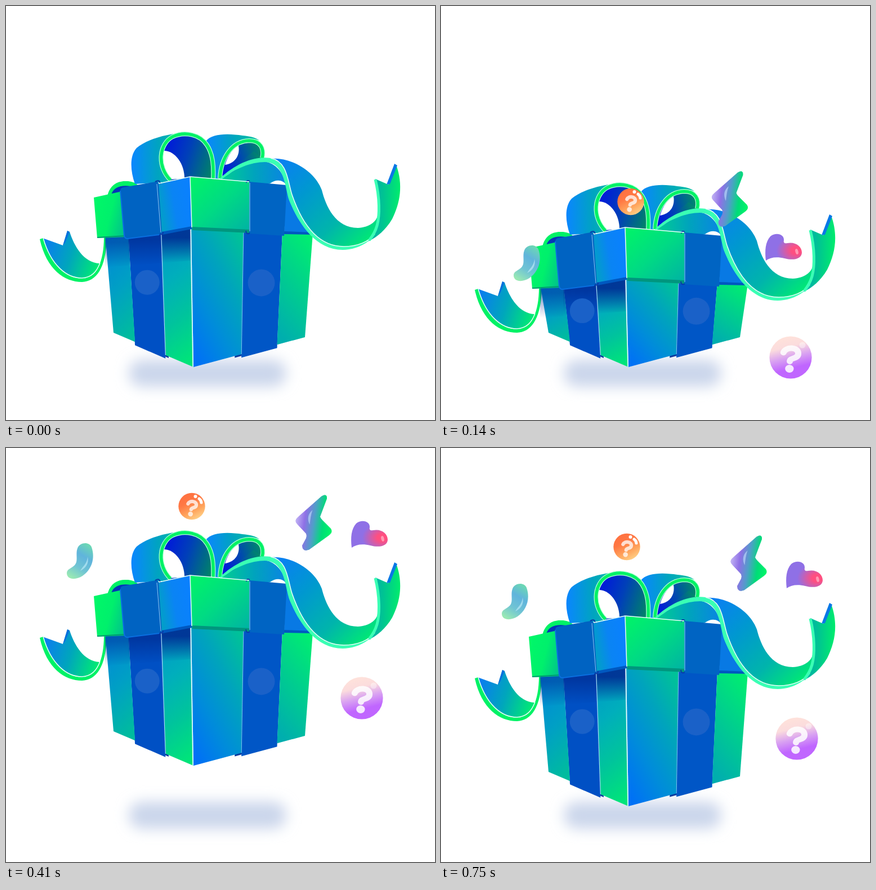
Animation, 762 px wide and 735 px high, one loop 850 ms. Source, as an HTML page:

```html
<!DOCTYPE html>
<html lang="en">
<head>
<meta charset="utf-8">
<title>Gift box</title>
<style>
html, body { margin: 0; width: 100%; height: 100%; overflow: hidden; background: #fff; }
svg { display: block; width: 100%; height: 100%; }
.glow, .rim, .shine, .seam, .mint { fill: none; }
.glow { stroke: #b4ffd6; stroke-width: 8; }
.rim { stroke: #00f266; stroke-width: 5.6; }
.shine { stroke: #e6fff8; stroke-width: 1.5; }
.seam { stroke: #0a3aa8; stroke-width: 2; }
.mint { stroke: #3affb4; stroke-width: 5; }
</style>
</head>
<body>
<svg viewBox="0 0 762 735">
  <defs id="defs">
    <filter id="soft" x="-25%" y="-120%" width="150%" height="340%"><feGaussianBlur stdDeviation="12"/></filter>
    <radialGradient id="heart" cx=".85" cy=".62" r=".55">
      <stop offset=".25" stop-color="#ff4f80"/>
      <stop offset="1" stop-color="#8f70e6"/>
    </radialGradient>
    <linearGradient id="shade" x2="0" y2="1">
      <stop offset=".3" stop-color="#002c92"/>
      <stop offset="1" stop-color="#002c92" stop-opacity="0"/>
    </linearGradient>
    <g id="ask">
      <path d="M-12,-8C-9,-19 12,-20 12,-7C12,2 -1,0 -1,7" fill="none" stroke="#fff" stroke-width="10" stroke-linecap="round"/>
      <circle cx="-1" cy="20" r="7" fill="#fff"/>
    </g>
    <path id="loopL" d="M292,309C268,285 271,245 296,232C318,222 345,228 357,247C368,264 369,285 368,307"/>
    <path id="loopR" d="M380,306C382,268 402,240 432,239C452,239 459,253 455,270"/>
  </defs>

  <rect x="218" y="628" width="280" height="48" rx="24" fill="#cbd6eb" filter="url(#soft)"/>

  <g id="back">
    <!-- left tail -->
    <path d="M65,412L101,425L109,399L113,401C121,426 138,456 166,457C161,474 152,484 135,484C108,483 80,462 65,412Z" fill="url(#tailL)"/>
    <path d="M101,425L109,399L113,401L105,420Z" fill="#0870dd"/>
    <path d="M60,414C72,468 104,490 135,490C160,489 178,466 179,410L174,410C174,455 160,484 135,484C108,483 80,462 66,412Z" fill="#00f266"/>
    <path d="M66,412C80,461 108,483 135,483C152,482 161,472 167,456" class="shine"/>
    <!-- small loop -->
    <path d="M180,338C184,318 198,310 214,311C222,311 229,313 234,318L222,340Z" fill="#00f266"/>
    <path d="M187,335C190,322 204,317 222,320L220,335Z" fill="#0636b8"/>
  </g>

  <g id="body"></g>

  <g id="lid">
    <!-- right loop -->
    <path d="M355,240C365,226 395,226 420,230C434,231 445,234 450,239C440,234 430,236 415,242C395,250 381,275 378,308L370,308C374,280 368,255 355,240Z" fill="url(#strap)"/>
    <use href="#loopR" fill="url(#innerR)"/>
    <path d="M382,303C405,288 430,273 454,270L440,258Z" fill="url(#innerR)"/>
    <path d="M389,282C394,265 403,253 413,248C416,264 408,279 389,282Z" fill="#fff"/>
    <use href="#loopR" class="glow"/>
    <use href="#loopR" class="rim"/>
    <!-- left loop -->
    <path d="M229,316C220,290 220,265 232,252C250,236 290,226 318,225C300,240 290,280 298,312Z" fill="url(#strap)"/>
    <use href="#loopL" fill="url(#innerL)"/>
    <path d="M279,257C300,256 317,280 317,306L291,308C281,293 275,275 279,257Z" fill="#fff"/>
    <use href="#loopL" class="glow"/>
    <use href="#loopL" class="rim"/>
    <!-- ribbon underside -->
    <path d="M381,308C415,285 440,274 460,276C480,280 492,295 499,319C492,308 480,307 469,315L440,316Z" fill="url(#under)"/>

    <!-- lid, left side -->
    <path d="M156,340L206,329L214,410L162,412Z" fill="url(#lidA)"/>
    <path d="M162,411L212,408" stroke="#009a70" stroke-width="2"/>
    <path d="M268,316L328,303L330,393L276,402Z" fill="url(#lidB)"/>
    <path d="M276,401L330,391L330,396L278,406Z" fill="#0058c0"/>
    <path d="M203,328Q203,323 208,322L266,312Q270,311 271,316L277,402Q277,406 272,406L216,413Q211,413 210,408Z" fill="#0063c2"/>
    <path d="M203,328L210,408Q211,413 216,413L272,406" fill="none" stroke="#0a6fe0" stroke-width="2"/>
    <path d="M265,312Q273,307 274,316M273,404Q279,408 279,401" class="seam"/>
    <path d="M268,316L275,402" stroke="#8fc6f2"/>

    <!-- lid, right side -->
    <path d="M327,303L434,312L434,399L330,394Z" fill="url(#lidC)"/>
    <path d="M330,392L434,397L434,403L331,398Z" fill="#00967e"/>
    <path d="M497,318L540,321L546,404L494,401Z" fill="#0879e4"/>
    <path d="M494,400L546,402L546,406L494,405Z" fill="#0058c0"/>
    <path d="M432,312L499,318L494,408L432,404Z" fill="#0064c3"/>
    <path d="M433,314V400" stroke="#8fd8f4"/>
    <path d="M427,314Q427,308 433,311M426,399Q427,407 433,403" class="seam"/>
    <path d="M272,315L327,303L432,312M327,303L330,393" class="shine"/>

    <!-- long ribbon -->
    <path d="M470,271C505,268 548,292 561,327C568,355 585,394 625,394C645,393 658,383 660,372L664,385L655,405C645,418 625,427 600,427C545,427 520,370 508,335C500,310 500,276 470,270Z" fill="url(#sweep)"/>
    <path d="M656,307L679,317L693,282C706,318 700,350 686,378C674,398 660,410 643,418C660,400 668,350 656,307Z" fill="url(#tailR)"/>
    <path d="M676,317L690,280L695,283L682,316Z" fill="#0878e6"/>
    <path d="M379,307C410,277 445,266 470,270C500,276 500,310 508,335C520,370 545,427 600,427C625,427 645,418 657,402L643,418C630,428 612,433 598,433C545,433 515,375 503,345C495,320 495,278 460,277C435,277 408,288 384,307Z" fill="#3affb4"/>
    <path d="M470,270C500,276 500,310 508,335C520,370 545,427 600,427C625,427 645,418 655,405" class="shine"/>
    <path d="M656,308C664,340 664,372 659,390Q655,404 645,416" class="mint"/>
  </g>

  <g id="items">
    <g data-pop="7 180" data-drift="-14 12">
      <path d="M141,166C145,155 162,154 166,164C173,184 166,204 150,215C138,223 122,222 122,210C122,203 130,202 136,196C143,189 137,176 141,166Z" fill="url(#bean)"/>
      <path d="M159,181C162,193 155,202 146,206C150,198 158,194 159,181Z" fill="#b4e6f4" opacity=".75"/>
    </g>
    <g data-pop="7 155" data-drift="0 -1">
      <circle cx="330" cy="104.500" r="23.700" fill="url(#orange)"/>
      <use href="#ask" transform="translate(330 106) rotate(8) scale(.62)" opacity=".75"/>
      <circle cx="336.500" cy="87" r="3" fill="#fff"/>
      <path d="M343,91Q347,94 347,98" fill="none" stroke="#fff" stroke-width="5" stroke-linecap="round"/>
    </g>
    <g data-pop="-29 105" data-drift="4.5 -17">
      <path d="M556,103Q566,97 565,107L553,139Q554,142 557,145L572,160Q576,166 570,171L534,197Q522,202 522,190L529,177Q531,170 527,167L513,152Q507,146 514,140Z" fill="url(#bolt)" stroke="url(#bolt)"/>
      <path d="M540,127C530,135 531,146 535,153C536,144 537,135 540,127Z" fill="#b6d4f8" opacity=".7"/>
    </g>
    <g data-pop="-35 201" data-drift="2 14">
      <path d="M612,163C610,145 611,130 620,120C630,112 645,116 644,127C643,131 645,133 650,132C665,129 676,138 676,149C675,161 660,163 645,159C632,156 620,157 612,163Z" fill="url(#heart)"/>
      <ellipse cx="667" cy="147" rx="2.600" ry="5" fill="#ffb0c4" opacity=".75" transform="rotate(-15 667 147)"/>
    </g>
    <g data-pop="0 77" data-drift="11 -15">
      <circle cx="621" cy="459" r="37.600" fill="url(#orb)"/>
      <circle cx="642" cy="437" r="5.500" fill="#fff" opacity=".4"/>
      <use href="#ask" transform="translate(621 459) rotate(3) scale(1.1 1)" opacity=".85"/>
    </g>
  </g>
</svg>

<script>
const NS = 'http://www.w3.org/2000/svg';
const $ = id => document.getElementById(id);
const lerp = (a, b, k) => a + (b - a) * k;

function add(parent, tag, attrs) {
  const el = document.createElementNS(NS, tag);
  for (const k in attrs) el.setAttribute(k, attrs[k]);
  parent.appendChild(el);
  return el;
}

// Evenly spaced colours across the shape's box at an angle in degrees.
function gradient(id, angle, colors) {
  const a = angle * Math.PI / 180, c = Math.cos(a), s = Math.sin(a);
  const r = 0.5 / Math.max(Math.abs(c), Math.abs(s));
  const g = add($('defs'), 'linearGradient',
    { id, x1: 0.5 - c * r, y1: 0.5 - s * r, x2: 0.5 + c * r, y2: 0.5 + s * r });
  colors.split(' ').forEach((color, i, all) =>
    add(g, 'stop', { 'stop-color': color, offset: i / (all.length - 1) }));
}

gradient('tailL', 15, '#0a7cf0 #00a6bc #00ea74');
gradient('strap', 0, '#0a86ff #00a4c0 #00c49c');
gradient('innerL', 15, '#0014e0 #0040b8 #00806c');
gradient('innerR', -15, '#0014e0 #0048b0 #008a68');
gradient('under', 0, '#00d090 #00a4bc #0a84e4');
gradient('lidA', 20, '#00f768 #00f06c #00c28c');
gradient('lidB', -15, '#00a4c0 #0a84f4 #0a80ff');
gradient('lidC', 45, '#00f566 #00da84 #00b2a4');
gradient('sweep', 40, '#0a7ef4 #0098d0 #00b4ac #00f36a');
gradient('tailR', 5, '#00a4b4 #00c690 #00ee6c');
gradient('sideA', 75, '#0088d8 #00a0c4 #00bc9e');
gradient('sideB', 80, '#0098c8 #00aebc #00c49c #00e47a');
gradient('sideC', 125, '#00c298 #00a4bc #008cda #0070f6');
gradient('sideD', 112, '#00ec72 #00cc90 #00aeae');
gradient('bean', 115, '#6cd8b4 #60b4dc #70c4d4 #98e8b4');
gradient('orange', 62, '#ff7040 #ff7844 #ffa45c #ffd68c');
gradient('bolt', 12, '#c2b4f4 #8f70e6 #4f9fc8 #00dc78 #00f568');
gradient('orb', 76, '#ffe2da #fbdcdd #d8a0f2 #c066ff #c066ff');

// Upright box edges, left to right: top point, bottom point.
const posts = [[176, 404, 191, 580], [329, 392, 333, 641], [545, 403, 531, 588]];
const panels = [];

// Part of a face between fractions u0 and u1; `depth` limits it to a strip under the lid.
function panel(face, u0, u1, fill, { hang = 0, depth = 0, opacity = 1 } = {}) {
  const el = add($('body'), 'polygon', { fill, opacity });
  panels.push(squash => {
    const [a, b] = [u0, u1].map(u => edge(face, u, squash));
    const foot = ([x, top, xb, yb]) => depth ? [x, top + depth] : [xb, yb + hang];
    el.setAttribute('points', [a.slice(0, 2), b.slice(0, 2), foot(b), foot(a)].join(' '));
  });
}

function edge(face, u, squash) {
  const [x, y, xb, yb] = posts[face].map((n, i) => lerp(n, posts[face + 1][i], u));
  return [x, y + squash, xb, yb];
}

function badge(face, u, r) {
  const el = add($('body'), 'circle', { r, fill: '#1a61c8' });
  panels.push(squash => {
    const [x, y, xb, yb] = edge(face, u, squash);
    el.setAttribute('cx', lerp(x, xb, 0.44));
    el.setAttribute('cy', lerp(y, yb, 0.44));
  });
}

function side(face, from, to, fills, band) {
  panel(face, from, to, band, { hang: 6 });
  panel(face, 0, from, fills[0]);
  panel(face, to, 1, fills[1]);
}

panel(0, 0.6, 0.69, '#0b3a9e', { hang: 3 });
panel(1, 0.37, 0.5, '#0b3a9e', { hang: 3 });
side(0, 0.268, 0.65, ['url(#sideA)', 'url(#sideB)'], '#0050c4');
side(1, 0.43, 0.75, ['url(#sideC)', 'url(#sideD)'], '#0056c6');
panel(0, 0, 0.268, 'url(#shade)', { depth: 60, opacity: 0.5 });
panel(0, 0.268, 0.65, 'url(#shade)', { depth: 60, opacity: 0.7 });
panel(0, 0.65, 1, 'url(#shade)', { depth: 60, opacity: 0.9 });
panel(0, 0.646, 0.654, '#a8dcf6');
panel(1, 0.428, 0.433, '#7cc4f0');
panel(0, 0.988, 1, '#e6fbff');
badge(0, 0.46, 22);
badge(1, 0.59, 24);

const vec = s => s.split(' ').map(Number);
const items = [...$('items').children].map(el =>
  ({ el, pop: vec(el.dataset.pop), drift: vec(el.dataset.drift) }));

const move = (el, x, y) => el.setAttribute('transform', `translate(${x} ${y})`);

const LOOP = 850, CROUCH = 70, SHOW = 140, RISE = 170, JUMP = 240, BEAT = 170, LAND = 750;
const HIGH = -77;

function draw(t) {
  const up = t >= JUMP;
  const squash = t >= CROUCH && !up ? 90 : 0;
  const lift = !up ? 0 : t < LAND ? HIGH : -5;

  move($('back'), 0, lift + squash);
  move($('lid'), 0, lift + squash);
  move($('body'), 0, lift);
  panels.forEach(update => update(squash));

  // Items burst out, then sway between two spots on every beat.
  $('items').style.display = t < SHOW ? 'none' : '';
  const sway = up ? Math.floor((t - JUMP) / BEAT) % 2 : 0;
  const drop = up ? lift - HIGH : t < RISE ? 88 : 0;
  for (const { el, pop, drift } of items) {
    const [x, y] = pop.map((p, i) => (up ? 0 : p) + sway * drift[i]);
    move(el, x, y + drop);
  }
}

const start = performance.now();
function tick() {
  draw((performance.now() - start) % LOOP);
  requestAnimationFrame(tick);
}
tick();
</script>
</body>
</html>
```
